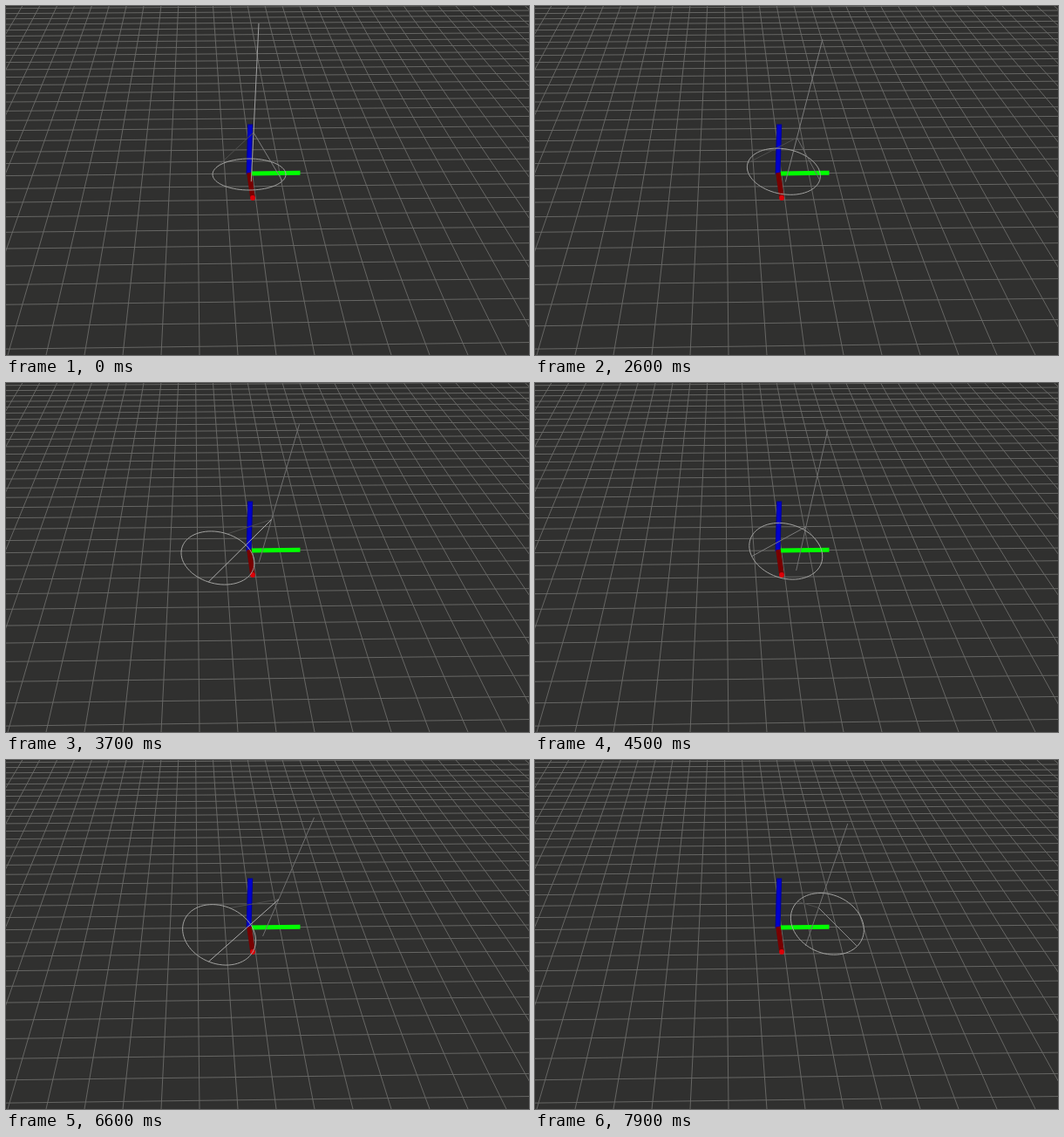
Recreate the animation shown at these times as an HTML page. Size 600 by 400 pixels, loop 8000 ms.

```html
<!DOCTYPE html>
<html lang="en">
<head>
<meta charset="utf-8">
<title>Swinging rotor</title>
<style>
html, body { margin: 0; width: 100%; height: 100%; overflow: hidden; background: #30302f; }
svg { display: block; width: 600px; height: 400px; }
path, line { fill: none; }
</style>
</head>
<body>
<svg viewBox="0 0 600 400">
  <rect width="600" height="400" fill="#30302f"/>
  <path id="grid" stroke="#6c6c6a" stroke-width="0.9"/>
  <g id="axes">
    <line x1="280" y1="192" x2="337.5" y2="191.3" stroke="#0f0" stroke-width="5"/>
    <line x1="278.6" y1="193" x2="280.2" y2="135.5" stroke="#0000a4" stroke-width="6"/>
    <line x1="278.6" y1="192" x2="280.2" y2="137" stroke="#0000d0" stroke-width="3.4"/>
    <line x1="279" y1="191" x2="283" y2="220" stroke="#780000" stroke-width="5.6"/>
    <circle cx="283" cy="220" r="2.9" fill="#dc0008"/>
  </g>
  <path id="far" stroke="#4e4e4d"/>
  <path id="pole"/>
  <path id="ring" stroke="#a2a2a0"/>
  <path id="near"/>
</svg>
<script>
const LOOP = 8000, STEP = 100;
const RELEASE = 1.3, SETTLED = 3.7, PERIOD = 3;
const $ = id => document.getElementById(id);
const rad = deg => deg * Math.PI / 180;
const grey = n => `rgb(${n},${n},${n})`.replace(/\.\d+/g, '');

// Perspective ground: columns meet above the stage, rows far to the right.
function gridPath() {
  const horizon = -330, meetX = 214, originY = 192;
  let d = '';
  for (let k = -40; k <= 60; k++) {
    const x = 222 + 44 * k;
    const topX = meetX + (x - meetX) * horizon / (horizon - 400);
    d += `M${topX} 0L${x} 400`;
  }
  for (let n = -11; n <= 26; n++) {
    const depth = 1 / (1 / (originY - horizon) + n * 0.0000526);
    const y = horizon + depth, slope = -depth / 57000;
    d += `M0 ${y - 280 * slope}L600 ${y + 320 * slope}`;
  }
  return d;
}

// At rest until release, then a growing swing with a slow drift.
function poseAt(t) {
  const since = Math.max(0, t - RELEASE), late = t - SETTLED;
  const ramp = Math.min(1, since / (SETTLED - RELEASE));
  const wave = peak => Math.cos(2 * Math.PI * (t - peak) / PERIOD);
  const blend = (rest, moving, amount) => rest + (moving - rest) * amount;
  const swing = wave(5.2), grow = ramp * ramp, rush = 1 - (1 - ramp) ** 2;
  const cx = blend(279, 281 + 3.2 * late + (38 + 3 * late) * swing, grow);
  return {
    cx,
    cy: blend(193, 193.5 - 7 * swing, rush),
    ry: 18 + 18 * (1 - Math.exp(-since / 2)),
    turn: blend(205, 148 + 1.2 * (cx - 279), grow),
    ax: blend(284, 311 + 2.6 * late + 7 * wave(5.4), ramp),
    ay: blend(145, 159 + 1.4 * late + 5 * wave(4.7), ramp),
    tx: blend(290, 339 + 5.3 * late + 8 * wave(5.8), rush),
    ty: 20 + 15.5 * since ** 0.65
  };
}

function draw(ms) {
  const t = Math.floor(ms % LOOP / STEP) * STEP / 1000;
  const { cx, cy, ry, turn, ax, ay, tx, ty } = poseAt(t);
  const skew = 11 * Math.min(1, (ry - 18) / 8);
  const rim = deg => [cx + 42 * Math.cos(rad(deg)), cy + ry * Math.sin(rad(deg + skew))];
  const points = Array.from({ length: 72 }, (_, i) => rim(i * 5).join(' '));
  const [far, near] = [rim(turn), rim(turn + 180)].sort((p, q) => p[1] - q[1]);
  const shape = (id, d) => $(id).setAttribute('d', d);
  const shade = (id, n) => $(id).setAttribute('stroke', grey(n));
  const footX = ax + 0.45 * (ax - tx), footY = ay + 0.45 * (ay - ty);
  shape('ring', `M${points.join('L')}Z`);
  shape('far', `M${ax} ${ay}L${far}`);
  shape('near', `M${ax} ${ay}L${near}`);
  shape('pole', `M${tx} ${ty}L${ax} ${ay}L${footX} ${footY}`);
  shade('near', 95 + 80 * Math.abs(Math.sin(rad(turn))));
  shade('pole', Math.max(112, 160 - 4 * (ry - 18)));
}

shape0();
function shape0() { $('grid').setAttribute('d', gridPath()); }
const start = performance.now();
function tick() {
  draw(performance.now() - start);
  requestAnimationFrame(tick);
}
tick();
</script>
</body>
</html>
```
